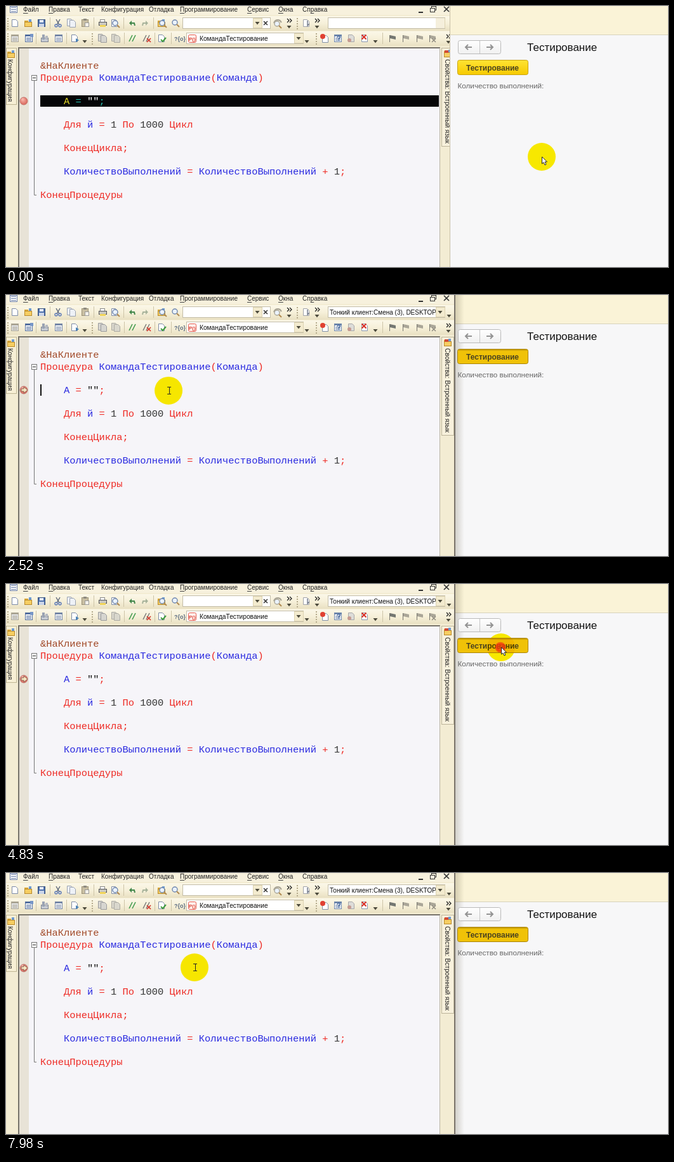
These frames come from a looping animation (1043 px wide and 412 px high, 8000 ms). An HTML page with a canvas:

```html
<!DOCTYPE html>
<html lang="ru">
<head>
<meta charset="utf-8">
<style>
html, body { margin: 0; width: 100%; height: 100%; overflow: hidden; background: #f7f7f8; }
canvas { display: block; }
</style>
</head>
<body>
<canvas id="stage" width="1043" height="412"></canvas>
<script>
const ctx = document.getElementById('stage').getContext('2d');
const LOOP = 8000;
const SANS = '"Liberation Sans", Arial, sans-serif';
const MONO = '"Liberation Mono", "Courier New", monospace';
const RED = '#ee2a24', BLUE = '#2a2ae0', DARK = '#333', GRAY = '#a9a596';

// Pointer route: time, x, y
const ROUTE = [
  [0, 844, 238], [60, 844, 238], [150, 866, 180], [240, 840, 100], [330, 620, 60],
  [450, 300, 110], [530, 208, 165], [630, 302, 208], [825, 302, 208], [840, 302, 235],
  [980, 302, 235], [1110, 756, 100], [2060, 756, 100], [2420, 300, 150], [2650, 200, 152],
  [2840, 320, 150], [3070, 780, 100], [6740, 780, 100], [7200, 875, 106], [7290, 875, 106],
  [7480, 934, 101], [7610, 934, 101], [7740, 740, 270], [7860, 440, 240], [7970, 297, 149], [8000, 297, 149]
];
const CLICKS = [1410, 4290, 4700, 5185, 5675, 6160];
const CLICK_MS = 480, PRESS_AT = 1440, STOP_AT = 1560;
const CARET = [[1560, 1900], [2430, 2960], [3490, 4020]];

function rect(x, y, w, h, fill, stroke) {
  if (fill) { ctx.fillStyle = fill; ctx.fillRect(x, y, w, h); }
  if (stroke) { ctx.strokeStyle = stroke; ctx.lineWidth = 1; ctx.strokeRect(x + .5, y + .5, w - 1, h - 1); }
}
function rounded(x, y, w, h, r, fill, stroke) {
  ctx.beginPath();
  ctx.roundRect(x + .5, y + .5, w - 1, h - 1, r);
  ctx.fillStyle = fill; ctx.fill();
  ctx.strokeStyle = stroke; ctx.lineWidth = 1; ctx.stroke();
}
function poly(points, fill, stroke, width = 1, close = true) {
  ctx.beginPath();
  points.forEach(([x, y]) => ctx.lineTo(x, y));
  if (close) ctx.closePath();
  if (fill) { ctx.fillStyle = fill; ctx.fill(); }
  if (stroke) { ctx.strokeStyle = stroke; ctx.lineWidth = width; ctx.stroke(); }
}
const line = (color, width, ...points) => poly(points, null, color, width, false);
function disc(x, y, r, fill, stroke, width = 1) {
  ctx.beginPath(); ctx.arc(x, y, r, 0, 7);
  if (fill) { ctx.fillStyle = fill; ctx.fill(); }
  if (stroke) { ctx.strokeStyle = stroke; ctx.lineWidth = width; ctx.stroke(); }
}
function text(s, x, y, font, color) {
  ctx.font = font; ctx.fillStyle = color; ctx.fillText(s, x, y);
}
function shade(x0, y0, x1, y1, ...colors) {
  const g = ctx.createLinearGradient(x0, y0, x1, y1);
  colors.forEach((c, i) => g.addColorStop(i / (colors.length - 1), c));
  return g;
}
function sideText(s, x, y, size) {
  ctx.save();
  ctx.translate(x, y); ctx.rotate(Math.PI / 2);
  text(s, 0, 0, `${size}px ${SANS}`, '#222');
  ctx.restore();
}

// Toolbar icons, centred on x, y
const icon = {
  page(x, y, edge = '#7d8ba6', fill = '#fff') {
    poly([[x - 4.5, y - 5.5], [x + 1.5, y - 5.5], [x + 4.5, y - 2.5], [x + 4.5, y + 5.5], [x - 4.5, y + 5.5]], fill, edge);
  },
  folder(x, y) {
    rect(x - 6, y - 4, 6, 3, '#d9a93c');
    rect(x - 6, y - 2, 12, 8, '#f6ce62', '#b98a2c');
    rect(x + 1, y - 6, 4, 4, '#6d9ad0');
  },
  disk(x, y, c = '#4f72ad') {
    rect(x - 6, y - 6, 12, 12, c, '#38507c');
    rect(x - 3, y - 5, 6, 4, '#e9eef8'); rect(x - 4, y + 1, 8, 5, '#cbd5e8');
  },
  cut(x, y) {
    line('#5c6679', 1.4, [x - 3, y - 6], [x + 2, y + 3]); line('#5c6679', 1.4, [x + 3, y - 6], [x - 2, y + 3]);
    disc(x - 3, y + 4, 2, null, '#5b79b8', 1.4); disc(x + 3, y + 4, 2, null, '#5b79b8', 1.4);
  },
  copy(x, y, edge = '#9aa2b0', fill = '#eef1f6') { icon.page(x - 2, y - 1, edge, fill); icon.page(x + 2, y + 1, edge, fill); },
  paste(x, y) {
    rect(x - 6, y - 6, 11, 12, '#c9bfa3', '#9c9277'); rect(x - 3, y - 7, 5, 3, '#8f8b80');
    rect(x - 1, y - 1, 7, 7, '#f3f1ea', '#9c9c9c');
  },
  print(x, y) {
    rect(x - 4, y - 6, 8, 5, '#fff', '#888'); rect(x - 6, y - 2, 13, 6, '#c9c7c0', '#55565a'); rect(x - 4, y + 3, 9, 3, '#f2d558');
  },
  lens(x, y, c = '#6f86ad') { disc(x - 1, y - 1, 4, '#eaf2fc', c, 1.4); line('#b08a50', 2, [x + 2, y + 2], [x + 6, y + 6]); },
  preview(x, y) { icon.page(x - 1, y); icon.lens(x + 1, y + 1); },
  turn(x, y, d, c) {
    line(c, 2, [x + 4 * d, y + 4], [x + 3 * d, y], [x - 2 * d, y]);
    poly([[x - 5 * d, y], [x - d, y - 4], [x - d, y + 4]], c);
  },
  find(x, y) { icon.folder(x, y); icon.lens(x + 2, y + 1); },
  grid(x, y, c = '#8a93a5', fill = '#e6e8ec') {
    rect(x - 6, y - 6, 12, 12, fill, c); rect(x - 6, y - 6, 12, 3, c);
    for (let i = 0; i < 3; i++) rect(x - 4, y - 1 + i * 2, 8, 1, c);
  },
  bars(x, y) { rect(x - 6, y - 1, 12, 7, '#c7ccd4', '#7e8592'); rect(x - 4, y - 6, 4, 8, '#9aa3b3'); rect(x + 1, y - 4, 4, 6, '#b6bac2'); },
  run(x, y) { icon.page(x - 1, y); poly([[x + 1, y], [x + 6, y + 3], [x + 1, y + 6]], '#4a83b7'); },
  check(x, y) { icon.page(x - 1, y); line('#3d9a3c', 2, [x - 2, y + 2], [x + 1, y + 5], [x + 6, y - 1]); },
  flag(x, y, c) { line('#77766f', 1, [x - 4.5, y - 5], [x - 4.5, y + 6]); poly([[x - 4, y - 5], [x + 5, y - 3], [x + 5, y + 2], [x - 4, y]], c); },
  arrow(x, y, c = '#4c4a3c') { poly([[x - 3.5, y - 2], [x + 3.5, y - 2], [x, y + 2.5]], c); },
  cross(x, y, s, c, w = 1.5) { line(c, w, [x - s, y - s], [x + s, y + s]); line(c, w, [x - s, y + s], [x + s, y - s]); },
  more(x, y) {
    for (const d of [0, 4]) line('#222', 1.3, [x - 4 + d, y - 3], [x - 1 + d, y], [x - 4 + d, y + 3]);
  },
  grip(x, y) { for (let i = -2; i < 3; i++) rect(x, y + i * 4, 2, 2, '#b5ab8c'); },
  bar(x, y) { rect(x, y - 9, 1, 18, '#cdc4a7'); }
};
const row = (name, y, ...xs) => xs.forEach(x => icon[name](x, y));

function combo(x, y, w, arrowX) {
  rect(x, y - 9, w, 18, '#fff', '#c3bda8');
  if (arrowX) { rect(arrowX - 7, y - 8, 15, 16, '#f3ebcf', '#ddd3b2'); icon.arrow(arrowX, y); }
}

function drawMenu() {
  rect(6, 0, 12, 11, '#fff', '#6b7ea6');
  for (const y of [2, 5, 8]) rect(8, y, 8, 1, '#6b7ea6');
  const items = [['Файл', 27, 0], ['Правка', 67, 0], ['Текст', 114], ['Конфигурация', 150], ['Отладка', 225],
    ['Программирование', 274, 0], ['Сервис', 380, 0], ['Окна', 429, 0], ['Справка', 467, 2]];
  for (const [label, x, key] of items) {
    text(label, x, 9, `10px ${SANS}`, '#222');
    if (key === undefined) continue;
    const left = x + ctx.measureText(label.slice(0, key)).width;
    rect(left, 11, ctx.measureText(label[key]).width, 1, '#444');
  }
  rect(650, 9, 7, 2, '#333');
  rect(670, 0, 8, 7, null, '#333'); rect(668, 3, 8, 7, '#f6f0dc', '#333');
  icon.cross(694, 5, 4, '#333', 1.7);
}

function drawToolbars(stopped) {
  let y = 27;
  icon.page(14, y); icon.folder(35, y); icon.disk(56, y); icon.cut(82, y); icon.copy(103, y);
  icon.paste(125, y); icon.print(152, y); icon.preview(172, y);
  icon.turn(199, y, 1, '#43874b'); icon.turn(219, y, -1, '#a8b39b');
  icon.find(245, y); icon.lens(267, y);
  row('bar', y, 69, 138, 185, 232);
  row('grip', y, 2, 458);
  combo(278, y, 139, 396);
  icon.cross(409, y, 3, '#333');
  ctx.beginPath(); ctx.arc(428, y + 1, 6, 3.3, 6); ctx.strokeStyle = GRAY; ctx.lineWidth = 2; ctx.stroke();
  icon.lens(428, y + 2, GRAY);
  icon.more(447, 23); icon.arrow(446, 33);
  icon.page(473, y, '#a0a2a8'); line('#747c8c', 1.5, [475, 23], [475, 31], [478, 28]);
  icon.more(491, 23); icon.arrow(490, 33);
  combo(507, y, 185, 684);
  if (stopped) {
    ctx.save();
    ctx.beginPath(); ctx.rect(508, 19, 169, 17); ctx.clip();
    text('Тонкий клиент:Смена (3), DESKTOP', 510, 31, `10px ${SANS}`, '#111');
    ctx.restore();
    icon.arrow(698, 33);
  } else rect(677, 19, 14, 16, '#f5efdc');

  y = 51;
  icon.grid(14, y, '#aaa594'); icon.grid(36, y, '#536f9f', '#fff'); rect(38, 44, 5, 5, '#7695c7');
  icon.bars(61, y); icon.grid(83, y, '#7587a7', '#fff'); icon.run(109, y); icon.arrow(124, 56);
  icon.copy(152, y, '#9b9c9d', '#d6d5d0'); icon.copy(173, y, '#acaaa3', '#d9d7cd');
  for (const x of [197, 202]) line('#3f9a4c', 1.5, [x - 3, 56], [x + 2, 46]);
  for (const x of [218, 223]) line('#777', 1.4, [x - 2, 56], [x + 3, 46]);
  icon.cross(225, 54, 3, '#d53a30', 1.7);
  icon.check(246, y);
  text('?{o}', 265, 55, `bold 9px ${SANS}`, '#5c6d82');
  row('bar', y, 47, 95, 186, 234, 260);
  row('grip', y, 2, 135, 488);
  combo(284, y, 185, 461);
  rounded(287, 45, 13, 13, 2, '#fff1ed', '#e2584a');
  text('P()', 288, 55, `bold 8px ${SANS}`, '#dd4a3e');
  text('КомандаТестирование', 305, 55, `10.2px ${SANS}`, '#111');
  icon.arrow(474, 56);
  icon.page(503, y + 1, '#8492a7'); disc(499, 48, 4, '#e04132');
  icon.grid(523, y, '#6e87ac', '#fff'); text('?', 521, 55, `bold 11px ${SANS}`, '#385d9a');
  icon.page(544, y, '#a6a7a9', '#dddcd8'); disc(541, 54, 3, '#c69a91');
  icon.page(565, y, '#8998ae'); icon.cross(564, 49, 3.5, '#da3226', 2);
  icon.arrow(582, 56);
  icon.bar(593, y);
  icon.flag(609, y, '#747772');
  for (const x of [630, 652, 672]) icon.flag(x, y, '#aaa698');
  icon.cross(674, 54, 3, '#8f8b80');
  icon.more(698, 48); icon.arrow(697, 57);
}

function drawSideTabs() {
  rect(0, 66, 17, 90, '#f7efd5', '#bfb694');
  icon.folder(8, 76);
  sideText('Конфигурация', 3, 84, 10);
  rect(686, 66, 20, 156, '#f8f1dc', '#bdb59b');
  icon.folder(696, 75);
  rect(691, 70, 6, 4, '#d34a36');
  sideText('Свойства: Встроенный язык', 692, 84, 10.2);
}

const CODE = [
  [54, 94, ['&НаКлиенте', '#a24a28']],
  [54, 113, ['Процедура ', RED], ['КомандаТестирование', BLUE], ['(', RED], ['Команда', BLUE], [')', RED]],
  [91, 187, ['Для ', RED], ['й', BLUE], [' = ', RED], ['1 ', DARK], ['По ', RED], ['1000 ', DARK], ['Цикл', RED]],
  [91, 224, ['КонецЦикла;', RED]],
  [91, 261, ['КоличествоВыполнений', BLUE], [' = ', RED], ['КоличествоВыполнений', BLUE], [' + ', RED], ['1', DARK], [';', RED]],
  [54, 298, ['КонецПроцедуры', RED]]
];
function codeLine([x, y, ...runs]) {
  for (const [s, color] of runs) {
    text(s, x, y + 5, `15.43px ${MONO}`, color);
    x += ctx.measureText(s).width;
  }
}

function drawEditor(stopped) {
  rect(19, 65, 665, 347, '#f6f5f9');
  rect(21, 67, 15, 345, '#e8e3d7');
  rect(19, 65, 665, 2, '#77736a');
  rect(19, 65, 2, 347, '#77736a');
  rect(683, 66, 1, 346, '#b9b3a5');
  line('#777', 1, [44.5, 117], [44.5, 298.5], [48, 298.5]);
  rect(40, 109, 9, 9, '#fff', '#777'); rect(42, 113, 5, 1, '#333');
  CODE.forEach(codeLine);
  if (!stopped) rect(54, 141, 628, 18, '#060608');
  const [name, sign, quote] = stopped ? [BLUE, RED, '#111'] : ['#e5da28', '#28bcae', '#fff'];
  codeLine([91, 150, ['А', name], [' = ', sign], ['""', quote], [';', sign]]);
  const ball = ctx.createRadialGradient(26, 147, 1, 28, 150, 7);
  ball.addColorStop(0, '#f7b6aa'); ball.addColorStop(1, '#d45a50');
  disc(28, 150, 6, ball, '#c57870');
  if (stopped) poly([[24, 148], [28, 148], [28, 145], [34, 150], [28, 155], [28, 152], [24, 152]], '#f4e6c2', '#8c5a48');
}

function drawClient(pressed, stopped) {
  const left = stopped ? 708 : 700;
  rect(left, 0, 343, 412, '#f7f7f8');
  rect(left, 0, 343, 45, '#faf3d7');
  rect(left, 45, 343, 1, '#d8d2bd');
  if (stopped) {
    rect(706, 0, 2, 412, '#79736a');
    rect(708, 0, 14, 412, shade(708, 0, 722, 0, 'rgba(80,70,40,.22)', 'rgba(80,70,40,0)'));
  } else rect(699, 0, 1, 412, '#c8c0a8');

  rounded(712, 54, 68, 22, 3, shade(0, 54, 0, 76, '#fff', '#f0f0f0'), '#b9b9b9');
  rect(746, 55, 1, 20, '#c4c4c4');
  for (const [x, d] of [[729, -1], [762, 1]]) {
    line('#939393', 2, [x - 5 * d, 65], [x + 4 * d, 65]);
    line('#939393', 2, [x + d, 61], [x + 5 * d, 65], [x + d, 69]);
  }
  text('Тестирование', 821, 71, `17px ${SANS}`, '#111');
  const fill = pressed ? '#f0c208' : shade(0, 85, 0, 109, '#ffe434', '#f6c900');
  rounded(711, 85, 112, 24, 3, fill, pressed ? '#a8830a' : '#c8a414');
  if (pressed) rect(713, 86, 108, 2, 'rgba(130,95,0,.3)');
  text('Тестирование', 725, 102, `bold 12px ${SANS}`, '#4b431f');
  text('Количество выполнений:', 711.5, 130, `11.7px ${SANS}`, '#666');
}

function pointerAt(t) {
  const i = Math.max(1, ROUTE.findIndex(p => p[0] > t));
  const [t0, x0, y0] = ROUTE[i - 1], [t1, x1, y1] = ROUTE[i];
  const k = (t - t0) / (t1 - t0);
  return [x0 + (x1 - x0) * k, y0 + (y1 - y0) * k];
}

function drawPointer(t) {
  const [x, y] = pointerAt(t);
  ctx.globalCompositeOperation = 'multiply';
  disc(x, y, 22, '#fff000');
  ctx.globalCompositeOperation = 'source-over';
  for (const start of CLICKS) {
    const p = (t - start) / CLICK_MS;
    if (p < 0 || p >= 1) continue;
    ctx.globalAlpha = 1 - p;
    disc(x - 1, y, 2 + 16 * p, p < .3 ? '#f03a10' : null, '#f03a10', 4);
    ctx.globalAlpha = 1;
  }
  if (x < 683 && y > 66) {
    line('#222', 1, [x - 2, y - 5.5], [x + 4, y - 5.5]);
    line('#222', 1, [x + 1.5, y - 5], [x + 1.5, y + 5]);
    line('#222', 1, [x - 2, y + 5.5], [x + 4, y + 5.5]);
  } else {
    const shape = [[0, 0], [0, 11], [2.5, 8.8], [4.5, 13], [6.5, 12], [4.6, 8], [8, 8]];
    poly(shape.map(([a, b]) => [x + .5 + a, y + b]), '#fff', '#222');
  }
}

function draw(t) {
  const stopped = t >= STOP_AT;
  rect(0, 0, 1043, 412, '#f3ecd3');
  rect(0, 0, 708, 14, '#f7f1dd');
  for (const y of [16, 40]) rect(0, y, 708, 23, shade(0, y, 0, y + 23, '#fbf7e8', '#f6f0d9', '#e9e0c2'));
  drawMenu();
  drawToolbars(stopped);
  drawSideTabs();
  drawEditor(stopped);
  if (CARET.some(([from, to]) => t >= from && t < to)) rect(54, 141, 2, 18, '#111');
  drawClient(t >= PRESS_AT, stopped);
  drawPointer(t);
}

function tick() {
  draw(performance.now() % LOOP);
  requestAnimationFrame(tick);
}
tick();
</script>
</body>
</html>
```
